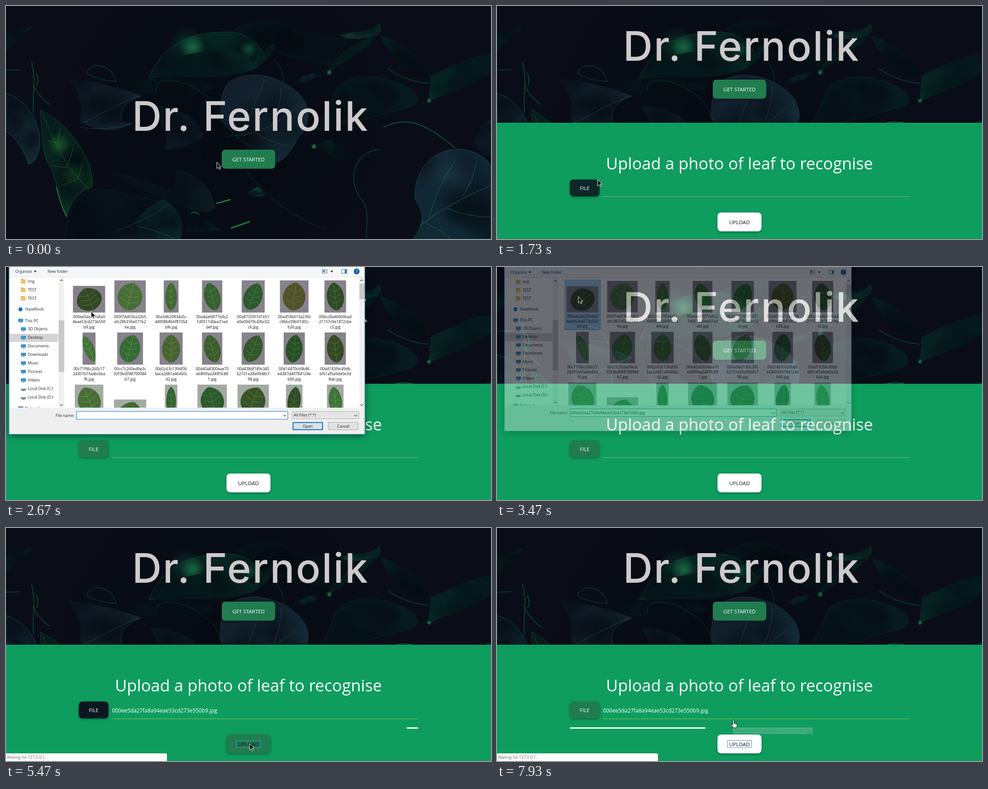
These frames come from a looping animation (1079 px wide and 519 px high, 8 s). An HTML page with a canvas:

```html
<!DOCTYPE html>
<html lang="en">
<head>
<meta charset="utf-8">
<title>Leaf recogniser</title>
<style>
html, body { margin: 0; width: 100%; height: 100%; overflow: hidden; background: #0a0d17; }
canvas { display: block; }
</style>
</head>
<body>
<canvas id="stage" width="1079" height="519"></canvas>
<script>
const W = 1079, H = 519, LOOP = 8000;
const SANS = '"Open Sans", "Noto Sans", sans-serif';
const GREEN = [33, 124, 80], MINT = [79, 179, 147], INK = [11, 23, 32], WHITE = [255, 255, 255];
const FILE_NAME = '000ee5da27fa8a94eae53cd273e550b9.jpg';
const stage = document.getElementById('stage').getContext('2d');

const clamp = v => Math.max(0, Math.min(1, v));
const ramp = (t, a, b) => clamp((t - a) / (b - a));
const pulse = (t, a, b, fade = 200) => ramp(t, a, a + fade) * (1 - ramp(t, b, b + fade));
const mix = (a, b, p) => `rgb(${a.map((v, i) => Math.round(v + (b[i] - v) * p))})`;

let seed = 7;
const random = () => (seed = (seed * 16807) % 2147483647) / 2147483647;

function layer() {
  const c = document.createElement('canvas');
  c.width = W;
  c.height = H;
  return c.getContext('2d');
}

function text(g, str, x, y, size, color, align = 'left') {
  g.font = `${size}px ${SANS}`;
  g.textAlign = align;
  g.fillStyle = color;
  g.fillText(str, x, y);
}

function box(g, x, y, w, h, fill, stroke, lw = 1) {
  if (fill) { g.fillStyle = fill; g.fillRect(x, y, w, h); }
  if (stroke) {
    g.strokeStyle = stroke;
    g.lineWidth = lw;
    g.strokeRect(x + lw / 2, y + lw / 2, w - lw, h - lw);
  }
}

function shadow(g, blur, y, color) {
  g.shadowBlur = blur;
  g.shadowOffsetY = y;
  g.shadowColor = color;
}

// Solves a CSS cubic-bezier timing curve by bisection.
function bezier(x1, y1, x2, y2) {
  const at = (a, b, s) => 3 * (1 - s) ** 2 * s * a + 3 * (1 - s) * s * s * b + s ** 3;
  return x => {
    let lo = 0, hi = 1;
    for (let i = 0; i < 24; i++) {
      const m = (lo + hi) / 2;
      if (at(x1, x2, m) < x) lo = m; else hi = m;
    }
    return at(y1, y2, lo);
  };
}
const longEase = bezier(.65, .815, .735, .395);
const shortEase = bezier(.165, .84, .44, 1);

// ---- leafy backdrop ----
const backdrop = layer();

function glow(x, y, r, color) {
  const g = backdrop.createRadialGradient(x, y, 0, x, y, r);
  g.addColorStop(0, color);
  g.addColorStop(1, color.replace(/[\d.]+\)$/, '0)'));
  backdrop.fillStyle = g;
  backdrop.fillRect(x - r, y - r, 2 * r, 2 * r);
}

// A leaf with a gradient fill, soft dark patches inside and an optional thin edge.
function leaf(d, x0, y0, x1, y1, from, to, edge) {
  const g = backdrop.createLinearGradient(x0, y0, x1, y1);
  g.addColorStop(0, from);
  g.addColorStop(1, to);
  const p = new Path2D(d);
  backdrop.save();
  backdrop.globalAlpha = .85;
  backdrop.fillStyle = g;
  backdrop.fill(p);
  backdrop.clip(p);
  const size = Math.hypot(x1 - x0, y1 - y0);
  for (let i = 0; i < 12; i++) {
    const x = x0 + (x1 - x0) * random(), y = y0 + (y1 - y0) * random();
    glow(x, y, size * (.12 + .2 * random()), 'rgba(4,9,16,.42)');
  }
  backdrop.restore();
  if (edge) vein(d, edge);
}

function vein(d, color, w = 1) {
  backdrop.strokeStyle = color;
  backdrop.lineWidth = w;
  backdrop.stroke(new Path2D(d));
}

function paintBackdrop() {
  box(backdrop, 0, 0, W, H, '#0a0d17');
  glow(480, 260, 420, 'rgba(3,8,16,.6)');
  leaf('M0 60L59 46Q30 72 0 103Z', 0, 103, 59, 46, '#05171b', '#062522');
  leaf('M510 50C560 25 610 30 632 50C680 72 740 68 760 75L720 132C650 120 560 95 510 50', 520, 40, 740, 110, '#04171a', '#051318', '#061d1c');
  leaf('M317 160C350 90 400 55 500 58C540 62 560 85 572 102L548 138C480 160 400 150 317 160', 330, 150, 560, 70, '#041b1d', '#083229', '#0a4436');
  glow(415, 92, 28, 'rgba(38,140,88,.7)');
  glow(400, 84, 40, 'rgba(14,90,62,.4)');
  glow(540, 96, 20, 'rgba(23,120,80,.55)');
  leaf('M330 160C370 108 430 95 500 100C540 108 560 128 545 143C480 168 400 155 330 160', 340, 160, 530, 100, '#041a1d', '#062825');
  leaf('M542 143C562 105 578 95 598 82Q596 116 545 145', 545, 143, 598, 82, '#052421', '#08382e');
  leaf('M738 64C780 54 810 62 830 39Q840 52 825 65Q770 82 738 64', 738, 64, 832, 40, '#0d4236', '#083a2d');
  leaf('M717 151C722 120 770 80 826 66C800 100 750 120 717 151', 717, 151, 820, 70, '#09412e', '#04191b');
  leaf('M832 66C880 80 930 110 942 165C890 150 850 110 832 66', 832, 66, 942, 165, '#051f1f', '#04161a');
  leaf('M1079 106C1030 110 980 140 945 155L940 213C990 190 1040 178 1079 148', 940, 210, 1079, 110, '#07302a', '#04191c');
  leaf('M735 185C760 150 840 150 900 185C925 205 915 220 900 225C840 240 770 260 685 276C720 240 725 205 735 185', 740, 260, 860, 160, '#041318', '#051d21', '#062724');
  leaf('M638 172Q665 148 702 149Q680 172 638 172', 638, 172, 702, 149, '#0a2026', '#102a34');
  leaf('M260 180Q320 150 410 165Q450 170 470 182Q380 205 300 195', 260, 170, 470, 190, '#051519', '#051a1c');
  leaf('M495 170C540 140 600 155 640 185C680 215 682 262 650 292C630 335 610 348 600 347C570 335 500 290 478 250C475 215 480 190 495 170', 490, 170, 650, 320, '#13202d', '#173340', '#1a3a42');
  vein('M488 290C560 290 600 265 645 225M560 285Q600 310 630 310M530 290Q550 220 575 165M588 272Q612 230 612 180', 'rgba(50,100,98,.5)');
  leaf('M165 255C175 200 145 170 137 162C200 165 260 185 302 200C260 212 248 235 258 258L280 262C240 285 190 278 165 255', 140, 165, 270, 270, '#0a141e', '#182a36');
  vein('M165 262C220 240 250 215 295 202M258 258Q245 220 302 200M165 270Q220 280 280 262', 'rgba(30,100,86,.6)');
  leaf('M0 195C40 205 75 250 75 300C75 340 60 350 50 352C40 320 20 290 0 280Z', 0, 200, 70, 340, '#0d1e2a', '#162e3a', '#124a44');
  leaf('M77 232C80 280 80 340 100 360C115 400 125 440 135 470C145 430 165 410 190 405C200 370 170 310 130 270C110 250 90 240 77 232', 80, 240, 185, 420, '#051c1b', '#0b3a26', '#0c4a32');
  glow(118, 308, 26, 'rgba(44,130,48,.5)');
  glow(150, 375, 30, 'rgba(24,104,48,.4)');
  vein('M82 240C105 300 135 365 185 408M92 300L115 305L120 270M100 355L135 360L150 315M125 400L160 385L172 345', 'rgba(56,150,62,.5)');
  vein('M112 402Q120 440 135 470', '#3a8f45', 1.5);
  leaf('M320 222C380 220 430 250 440 290C420 312 370 322 350 318C372 300 335 250 320 222', 330, 225, 440, 310, '#0a1620', '#101f29');
  leaf('M225 370C280 375 330 395 370 412L380 365C420 370 460 400 465 450C440 475 380 440 340 425Q280 400 225 370', 240, 370, 460, 450, '#08131b', '#0e2029');
  leaf('M130 519C140 430 180 400 230 410C300 430 360 430 385 460Q395 490 390 519', 140, 430, 380, 519, '#061018', '#06161a', '#06231f');
  leaf('M270 500Q305 450 350 430C388 448 395 490 388 519H250', 260, 500, 390, 450, '#061a1e', '#0e3034');
  vein('M245 500Q310 480 360 442M290 490Q340 500 375 519', 'rgba(40,130,95,.5)');
  leaf('M537 415L560 402L578 420Q555 432 537 415', 537, 415, 578, 420, '#0a3a32', '#0f4a3a');
  leaf('M405 488L450 480L480 500L400 502', 405, 490, 480, 490, '#051d20', '#062426');
  vein('M468 440L500 431M500 495L543 480', '#1d7a3c', 3);
  vein('M412 462Q420 455 430 465', '#14603a', 2);
  leaf('M683 313L722 296L770 345Q740 350 720 330', 683, 310, 770, 345, '#06241f', '#050f16');
  glow(685, 313, 7, 'rgba(43,160,90,.9)');
  leaf('M1040 300Q1060 255 1079 255V335Q1050 330 1040 300', 1040, 300, 1079, 260, '#0a1620', '#0f202a');
  leaf('M910 430C905 370 950 320 1000 319C1040 318 1079 340 1079 365V519H905C930 490 932 460 910 430', 920, 340, 1079, 519, '#14293a', '#10303a', '#124e48');
  glow(985, 375, 60, 'rgba(36,66,78,.4)');
  vein('M920 490C970 450 1030 420 1079 400M940 475Q960 400 1000 345M980 450Q1030 470 1079 470M925 480Q970 500 990 519M1015 425Q1040 390 1045 350', 'rgba(44,140,110,.5)', 1.2);
  vein('M840 270C900 240 940 270 1000 316', '#126444', 1.4);
  vein('M832 320C780 320 755 385 790 430C812 455 800 485 802 519', '#094236', 1.5);
  vein('M57 125C68 180 58 190 61 238M60 175Q75 205 97 219M67 150Q75 165 68 178', '#0b4e38', 1.6);
  vein('M180 150C185 125 235 125 245 168Q200 165 180 150', '#0a3c32', 1.3);
  vein('M535 365C570 420 640 470 710 498M597 120Q618 140 617 170M335 190C325 150 400 165 430 190Q470 210 480 260', '#083c32');
  vein('M0 143L32 142M850 140Q890 168 940 172', '#07302a', 2.5);
  glow(941, 211, 6, 'rgba(27,145,80,.9)');
  glow(719, 148, 7, 'rgba(27,138,80,.9)');
}

// ---- page ----
function button(g, x, y, w, h, label, fill, ink) {
  g.save();
  shadow(g, 5, 2, 'rgba(0,0,0,.35)');
  g.fillStyle = fill;
  g.beginPath();
  g.roundRect(x, y, w, h, 8);
  g.fill();
  g.restore();
  text(g, label, x + w / 2, y + h / 2 + 4.5, 11.6, ink, 'center');
}

function progress(g, t, y) {
  const x = 162, w = 755, cycle = 2100, sweep = 1260, start = 3505;
  const bar = (left, right) => {
    const a = Math.max(0, left), b = Math.min(100, 100 - right);
    if (b > a) box(g, x + a * w / 100, y, (b - a) * w / 100, 3, '#fbfdfb');
  };
  const eased = (ease, delay) => ease(clamp(((t - start - delay + cycle) % cycle) / sweep));
  const a = eased(longEase, 0), b = eased(shortEase, 1150);
  bar(-35 + 135 * a, 100 - 190 * a);
  bar(-200 + 307 * b, 100 - 108 * b);
}

function page(g, t) {
  const s = Math.round(259 * (1 - (1 - ramp(t, 776, 1308)) ** 3));
  const lift = Math.round(.438 * s + .000627 * s * s), top = H - s;
  g.drawImage(backdrop.canvas, 0, 0);

  g.font = '500 91px Inter, "Open Sans", sans-serif';
  g.letterSpacing = '2.8px';
  g.textAlign = 'center';
  g.fillStyle = '#cecacc';
  g.fillText('Dr. Fernolik', 544, 278 - lift);
  g.letterSpacing = '0px';
  button(g, 480, 320 - lift, 119, 42.5, 'GET STARTED', mix(GREEN, MINT, pulse(t, 70, 1200, 70)), '#fff');

  box(g, 0, top, W, H, '#0e9d5f');
  text(g, 'Upload a photo of leaf to recognise', 539.5, top + 104, 36.3, '#fff', 'center');

  const fileHover = Math.max(pulse(t, 1700, 3560), pulse(t, 3880, 4130), ramp(t, 6750, 6950));
  button(g, 162, top + 126.5, 66, 37.5, 'FILE', mix(INK, GREEN, fileHover), '#fff');
  const chosen = t > 3600;
  if (chosen) text(g, FILE_NAME, 236, top + 151, 11.9, '#fff');
  box(g, 236, top + 164, 681, chosen ? 2 : 1, chosen ? '#4caf50' : '#9aa79c');

  button(g, 490.5, top + 200, 98, 42, 'UPLOAD', mix(WHITE, GREEN, pulse(t, 4290, 6250)), '#111');
  if (t > 4930) {
    box(g, 512, 473, 55, 16.5, null, '#3f93dc');
    progress(g, t, 444);
  }
  if (t > 5000) {
    g.fillStyle = '#fff';
    g.beginPath();
    g.roundRect(-5, 502, 363, 22, 3);
    g.fill();
    text(g, 'Waiting for 127.0.0.1...', 2, 514, 8.8, '#666');
  }
  tooltip(g, 539, 436, .25 * pulse(t, 4130, 4200, 70));
  tooltip(g, 524.5, 444, .2 * ramp(t, 7800, 7930));
}

function tooltip(g, x, y, alpha) {
  if (!alpha) return;
  g.save();
  g.globalAlpha = alpha;
  box(g, x, y, 178, 14.5, '#fff', '#777');
  text(g, FILE_NAME, x + 4, y + 10.5, 8.7, '#222');
  g.restore();
}

// ---- file dialog ----
const panel = layer();
const captions = [
  '000ee5da27fa8a9 4eae53cd273e550 b9.jpg', '000f74d036a32b5 afc286336e077e2 6e.jpg',
  '00a3db29834a5c d4998b866f81054 bfe.jpg', '00a4aafd077e9c2 1d0511d0ee31ed def.jpg',
  '00a8735f97d1b51 e0e00d79c43bc02 c6.jpg', '00ad596413a23fd c9bbc09b97df2c b26.jpg',
  '00bcc8a469696ad 21157c9e1872cbe c5.jpg', '00c71f96c260c17 24301b1faabc6ba f6.jpg',
  '00cc7c260ed9e3c 92f3bd098700084 b7.jpg', '00d2c63c139df36 6ace2d81a46460c d2.jpg',
  '00d40a8300eae70 e68f0faa349f3c88 1.jpg', '00d438df189c345 62101e28e09d8c7 98.jpg',
  '00d14470cb9b86 e4387d49784124e b06.jpg', '00dd183fdc49db 6f61af5a9de0e3d 8ab.jpg'
];
const photoWidths = [70, 68, 32, 44, 50, 62, 47, 28, 56, 50, 44, 50, 46, 46, 62, 70, 27, 64, 68, 36, 36];
const places = ['img', 'TEST', 'TEST', 'HazeNook', 'This PC', '3D Objects', 'Desktop', 'Documents', 'Downloads',
  'Music', 'Pictures', 'Videos', 'Local Disk (C:)', 'Local Disk (D:)', 'Network'];

function chevron(g, x, y, up) {
  const d = up ? -2.5 : 2.5;
  g.strokeStyle = '#444';
  g.lineWidth = 1.2;
  g.beginPath();
  g.moveTo(x - 3, y - d / 2);
  g.lineTo(x, y + d / 2);
  g.lineTo(x + 3, y - d / 2);
  g.stroke();
}

function photo(g, i) {
  const cx = 190 + 89.1 * (i % 7), w = photoWidths[i], row = Math.floor(i / 7);
  const y = i === 0 ? 43 : i === 15 ? 290 : 31 + 113.3 * row;
  const h = i === 0 ? 58 : 70, bottom = row === 2;
  box(g, cx - w / 2, y, w, h, bottom ? '#a3aaa2' : '#87818c');
  g.save();
  g.beginPath();
  g.rect(cx - w / 2, y, w, h);
  g.clip();
  g.translate(cx, y + h / 2);
  g.rotate(((i * 5) % 7 - 3) * .13);
  const hue = 92 + (i * 37) % 30, lit = 21 + (i * 11) % 13;
  const rx = w * .42, ry = h * .44;
  g.fillStyle = `hsl(${i === 5 ? 62 : hue},34%,${lit}%)`;
  g.beginPath();
  g.moveTo(0, -ry);
  g.bezierCurveTo(rx * 1.3, -ry * .6, rx * 1.2, ry * .8, 0, ry);
  g.bezierCurveTo(-rx * 1.2, ry * .8, -rx * 1.3, -ry * .6, 0, -ry);
  g.fill();
  g.strokeStyle = `hsl(${hue},30%,${lit + 13}%)`;
  g.lineWidth = 1;
  g.beginPath();
  g.moveTo(0, -ry);
  g.lineTo(0, ry + 4);
  for (const k of [-.3, .1, .5]) {
    g.moveTo(-rx * .65, ry * (k - .25));
    g.lineTo(0, ry * k);
    g.lineTo(rx * .65, ry * (k - .25));
  }
  g.stroke();
  g.restore();
}

function sidebar(g) {
  box(g, 17, 147, 106, 18, '#d4d4d4');
  places.forEach((name, i) => {
    const y = i < 3 ? 33 + 18.5 * i : i < 4 ? 94 : i < 14 ? 118.5 + 18.5 * (i - 4) : 309;
    const root = i === 3 || i === 4 || i === 14, x = root ? 51 : 57;
    if (i === 3) {
      g.fillStyle = '#1677c8';
      g.beginPath();
      g.arc(41, y, 4.5, 0, 7);
      g.fill();
    } else if (i < 3) {
      box(g, 42, y - 4, 10, 9, '#eec45c');
      box(g, 42, y - 5, 5, 2, '#d9a83c');
    } else {
      const drive = i === 12 || i === 13;
      box(g, x - 15, y - (drive ? 0 : 4), 11, drive ? 4 : 7, drive ? '#7d8b95' : '#3b93c8');
      box(g, x - 12, y + 4, 5, 1, '#57626b');
    }
    text(g, name, x, y + 3, 8.5, '#222');
  });
  box(g, 124, 23, 12, 285, '#f0f0f0');
  box(g, 124, 118, 12, 112, '#c9c9c9');
  chevron(g, 130, 31, true);
  chevron(g, 130, 302);
}

function files(g, t) {
  if (t > 2870) {
    const picked = t > 3270;
    box(g, 150.5, 28.5, 80, 112, picked ? '#a9d4fa' : '#e5f3ff', picked ? '#70b7f2' : '#d3e9fb');
  }
  for (let i = 0; i < 21; i++) photo(g, i);
  captions.forEach((c, i) => c.split(' ').forEach((line, n) =>
    text(g, line, 190 + 89.1 * (i % 7), 113 + 113 * Math.floor(i / 7) + 11.2 * n, 8.4, '#111', 'center')));
  box(g, 777, 23, 11, 285, '#f0f0f0');
  box(g, 777, 38, 11, 34, '#c9c9c9');
  chevron(g, 782, 31, true);
  chevron(g, 782, 302);
}

function toolbar(g) {
  box(g, 17, -40, 771, 63, '#f5f6f7');
  box(g, 17, 23, 771, 1, '#dedede');
  text(g, 'Organize', 30, 14.5, 8.6, '#1d2a4a');
  text(g, 'New folder', 100, 14.5, 8.6, '#1d2a4a');
  g.fillStyle = '#333';
  for (const x of [70, 714]) g.fill(new Path2D(`M${x} 10h6l-3 4z`));
  box(g, 696, 7, 11, 9, '#dfe6ee', '#6d7c8c');
  box(g, 698, 9, 4, 4, '#3f7fb5');
  box(g, 738, 7, 12, 9, '#fff', '#3f6f9f');
  box(g, 745, 7, 5, 9, '#3f7fb5');
  g.fillStyle = '#0f5db8';
  g.beginPath();
  g.arc(771, 11.5, 6.3, 0, 7);
  g.fill();
  text(g, '?', 771, 15, 9.5, '#fff', 'center');
}

function footer(g, t, ready) {
  box(g, 17, 308, 772, 58, '#efefef');
  if (!ready) {
    box(g, 117, 318, 41, 11, '#fff');
    box(g, 162, 316, 460, 18, '#fff');
    box(g, 631, 316, 145, 17, '#fff');
    return;
  }
  text(g, 'File name:', 158, 328, 8.5, '#222', 'right');
  box(g, 162, 315.5, 460, 18, '#fff', '#0078d7');
  if (t > 3270) text(g, FILE_NAME, 164.5, 328, 8.4, '#111');
  chevron(g, 615, 325);
  box(g, 631, 315.5, 145, 17, '#e5e5e5', '#adadad');
  text(g, 'All Files (*.*)', 634.5, 327, 8.5, '#222');
  chevron(g, 769, 325);
  box(g, 632, 339, 66, 17.5, '#e1e1e1', '#0078d7', 2);
  box(g, 709, 339, 66, 17.5, '#e1e1e1', '#adadad');
  text(g, 'Open', 665, 351, 8.6, '#222', 'center');
  text(g, 'Cancel', 742, 351, 8.6, '#222', 'center');
}

function dialog(g, t) {
  const alpha = pulse(t, 2280, 3370, 167);
  if (!alpha) return;
  const k = 1.0246 - .041 * (1 - alpha), ready = t > 2580;
  const p = panel;
  p.clearRect(0, 0, W, H);
  p.save();
  p.translate(402.5, 80);
  p.scale(k, k);
  p.translate(-402.5, -80);
  p.save();
  shadow(p, 14, 3, 'rgba(0,0,0,.5)');
  box(p, 16, -220, 773, 586, '#fff');
  p.restore();
  if (ready) {
    p.save();
    p.beginPath();
    p.rect(16, 22, 773, 286);
    p.clip();
    sidebar(p);
    files(p, t);
    p.restore();
    toolbar(p);
  }
  footer(p, t, ready);
  box(p, 16, -220, 773, 586, null, '#3a92c4');
  p.restore();
  g.globalAlpha = alpha;
  g.drawImage(p.canvas, 0, 0);
  g.globalAlpha = 1;
}

// ---- pointer: [time, x, y] ----
const path = [
  [0, 469, 348], [60, 469, 348], [130, 490, 345], [270, 490, 345], [470, 504, 343], [1130, 504, 343],
  [1870, 195, 391], [2130, 195, 391], [2400, 203, 183], [2780, 186, 78], [2860, 186, 78], [2930, 183, 70],
  [3070, 183, 70], [3130, 181, 66], [3540, 181, 66], [4070, 541, 408], [4330, 541, 468], [4560, 542, 480],
  [5870, 542, 480], [6670, 532, 434], [6850, 526, 427], [LOOP, 526, 427]
];
const arrow = new Path2D('M0 0V14.2L3.3 11.2L5.6 16.2L7.9 15.2L5.6 10.4H10Z');
const hand = new Path2D('M-1.6 1.5Q0 -1.2 1.6 1.5V6.5L7 8Q8.6 8.6 8.3 12L7 18H0L-4.8 11.5Q-4.6 9 -2.8 10.2L-1.6 11.6Z');

function pointer(g, t) {
  const i = Math.max(1, path.findIndex(p => p[0] > t));
  const [t0, x0, y0] = path[i - 1], [t1, x1, y1] = path[i];
  const q = ramp(t, t0, t1), e = q * q * (3 - 2 * q);
  const link = [[100, 800], [1760, 2180], [3940, 5000], [6700, LOOP]].some(([a, b]) => t >= a && t < b);
  g.save();
  g.translate(x0 + (x1 - x0) * e, y0 + (y1 - y0) * e);
  g.lineWidth = 1;
  g.lineJoin = 'round';
  g.fillStyle = link ? '#fff' : '#000';
  g.strokeStyle = link ? '#000' : '#fff';
  g.fill(link ? hand : arrow);
  g.stroke(link ? hand : arrow);
  if (link) g.stroke(new Path2D('M1.6 6V10M4 7.5V10.5M6.2 8V11'));
  g.restore();
}

function draw() {
  const t = (performance.now() - began) % LOOP;
  page(stage, t);
  dialog(stage, t);
  pointer(stage, t);
  requestAnimationFrame(draw);
}

paintBackdrop();
const began = performance.now();
draw();
</script>
</body>
</html>
```
